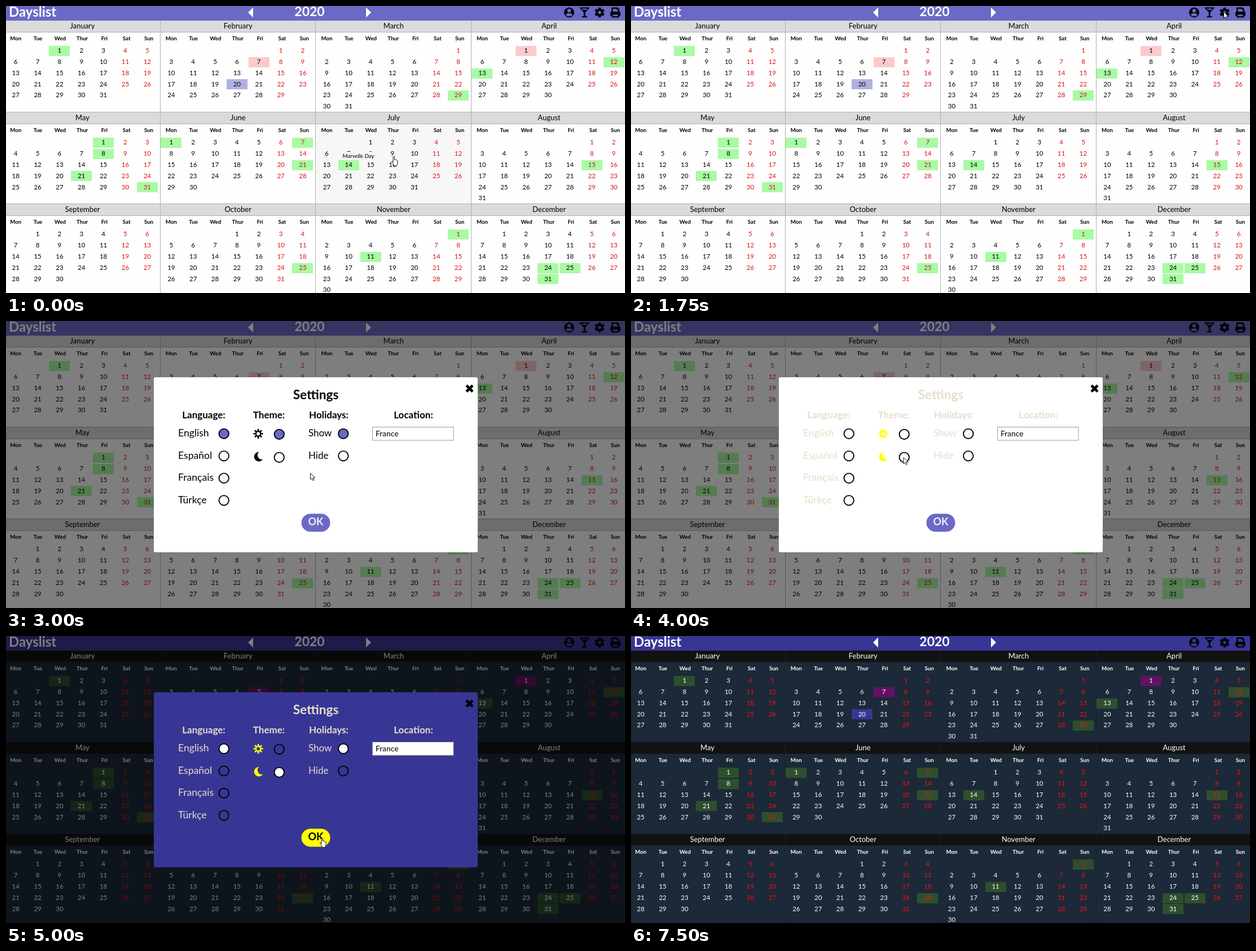
Recreate the animation shown at these times as an HTML page. Size 1097 by 510 pixels, loop 7750 ms.

```html
<!DOCTYPE html>
<html lang="en">
<head>
<meta charset="utf-8">
<title>Year calendar</title>
<style>
  html, body { margin: 0; width: 100%; height: 100%; overflow: hidden; }
  svg { display: block; width: 100%; height: 100%; font-family: Lato, sans-serif; }
  text { white-space: pre; }
  .mid { text-anchor: middle; }
  .bold { font-weight: 700; }
  .bar { fill: var(--bar); }
  .page { fill: var(--page); }
  .head { fill: var(--head); }
  .ink { fill: var(--ink); }
  .red { fill: var(--red); }
  .line { stroke: var(--line); }
  .green { fill: var(--green); }
  .pink { fill: var(--pink); }
  .blue { fill: var(--blue); }
  .box { fill: var(--box); }
  .label { fill: var(--label); }
  .icon { fill: var(--icon); }
  .iconLine { stroke: var(--icon); }
  .white { fill: #fff; }
</style>
</head>
<body>
<svg id="stage" viewBox="0 0 1097 510">
  <g id="calendar"></g>
  <g id="tip">
    <rect x="592" y="259" width="66" height="15" fill="#f8f7f7"/>
    <text x="624.5" y="269.5" class="mid" font-size="10.3" font-style="italic">Marvelle Day</text>
  </g>
  <g id="modal"></g>
  <path id="arrow" d="M.5 .5V11.7L3.1 9.4L4.9 13.4L6.8 12.6L5.1 8.7H8.7Z"
        fill="#fff" stroke="#000" stroke-width=".9"/>
  <path id="hand" d="M3.2 11V1.9Q3.2 .5 4.4 .5T5.6 1.9V6.3Q7.3 5.7 7.7 6.9Q9.2 6.4 9.5 7.7Q11 7.4 11 9V12.5Q11 14.5 9.8 16V17.7H4.4V16.2L1.1 11.6Q0 9.6 1.4 9.1Q2.3 9 3.2 11Z"
        fill="#fff" stroke="#000" stroke-width=".9"/>
</svg>
<script>
const LOOP = 7750;
const $ = id => document.getElementById(id);

const MONTHS = ['January', 'February', 'March', 'April', 'May', 'June', 'July',
  'August', 'September', 'October', 'November', 'December'];
const DAYS = ['Mon', 'Tue', 'Wed', 'Thur', 'Fri', 'Sat', 'Sun'];
const EVENTS = {
  green: '1/1 3/29 4/12 4/13 5/1 5/8 5/21 5/31 6/1 6/7 6/21 7/14 8/15 10/25 11/1 11/11 12/24 12/25 12/31'.split(' '),
  pink: ['2/7', '4/1'],
  blue: ['2/20']
};

// Light and dark value of each colour
const THEME = {
  bar: ['#6a69c6', '#383694'],
  page: ['#fefefe', '#1c2938'],
  head: ['#dbdbdb', '#121212'],
  ink: ['#000000', '#ffffff'],
  red: ['#dc1215', '#ff0d0d'],
  line: ['#b0b0b0', '#18232f'],
  green: ['#a9faa4', '#2e4f2e'],
  pink: ['#fccacc', '#621262'],
  blue: ['#b1b1e1', '#383694'],
  box: ['#ffffff', '#383694']
};

// Time, x, y, shape
const POINTER = [
  [0, 683, 266.5, 'hand'], [250, 850, 122, 'hand'], [500, 903, 74, 'hand'], [750, 901, 71, 'hand'],
  [1000, 1028, 27, 'hand'], [1250, 1040, 18, 'arrow'], [1500, 1050, 10, 'arrow'],
  [2250, 1036, 27, 'arrow'], [2500, 875, 194, 'arrow'], [2750, 709, 246, 'arrow'],
  [3000, 539, 270, 'arrow'], [3250, 494, 250, 'arrow'], [3500, 477, 236, 'arrow'],
  [4000, 482.5, 242, 'arrow'], [4250, 490, 252, 'arrow'], [4500, 519, 298, 'arrow'],
  [4750, 555, 357, 'hand'], [5000, 556, 358, 'hand'], [6750, 552, 59, 'hand'],
  [7000, 561.5, 22, 'arrow'], [7250, 0, 0, '']
];
const DARK = [[0, 0], [4250, .5], [4500, 1]];
const JULY = [[0, 1], [250, .4], [500, 0]];
const APRIL = [[0, 0], [250, .5], [500, 1], [1250, .4], [1500, 0]];

const text = (x, y, size, cls, str) =>
  `<text x="${x}" y="${y}" font-size="${size}" class="${cls}">${str}</text>`;
const rect = (x, y, w, h, cls, more = '') =>
  `<rect x="${x}" y="${y}" width="${w}" height="${h}" class="${cls}" ${more}/>`;
const line = (x1, y1, x2, y2) =>
  `<path d="M${x1} ${y1}L${x2} ${y2}" class="line" stroke-width="1"/>`;
const spokes = (n, from, to) => Array.from({ length: n }, (_, i) => {
  const c = Math.cos(i * 2 * Math.PI / n), s = Math.sin(i * 2 * Math.PI / n);
  return `M${c * from} ${s * from}L${c * to} ${s * to}`;
}).join('');

function month(m) {
  const col = m % 4, row = m >> 2;
  const x0 = 17.2 + 275.6 * col, y0 = 163.1 * row;
  const first = (new Date(2020, m, 1).getDay() + 6) % 7;
  const count = new Date(2020, m + 1, 0).getDate();
  let out = text(135.5 + 275.7 * col, y0 + 40, 13, 'mid ink', MONTHS[m]);
  DAYS.forEach((d, i) => out += text(x0 + 39.3 * i, y0 + 61, 9.7, 'mid bold ink', d));
  for (let d = 1; d <= count; d++) {
    const slot = first + d - 1, wd = slot % 7;
    const x = x0 + 38.85 * wd, y = y0 + 79.3 + 19.85 * Math.floor(slot / 7);
    const kind = Object.keys(EVENTS).find(k => EVENTS[k].includes(`${m + 1}/${d}`));
    if (kind) out += rect(Math.round(x - 18.6), Math.round(y - 8.5), 37, 18, kind);
    out += text(x, y + 3.7, 11.5, 'mid ' + (wd > 4 ? 'red' : 'ink'), d);
  }
  return out;
}

function topBar() {
  return rect(0, 0, 1097, 26, 'bar') +
    text(5, 18.7, 24, 'bold white', 'Dayslist') +
    text(538, 18.2, 23, 'mid bold white', '2020') +
    `<path d="M429 11.5L438 2.5V20.5ZM647 11.5L638 2.5V20.5Z" class="white"/>
    <circle cx="998" cy="11.5" r="9"/>
    <circle cx="998" cy="8.4" r="3.3" class="bar"/>
    <path d="M992 16.2Q993 13 996 13H1000Q1003 13 1004 16.2Q998 21 992 16.2Z" class="bar"/>
    <path d="M1016 2.5H1034.5L1026.7 11.5V18.2H1030V20.3H1020.5V18.2H1023.8V11.5ZM1020 4.6L1021.8 6.7H1028.8L1030.6 4.6Z" fill-rule="evenodd"/>
    <g transform="translate(1052 11.5)" stroke="#000">
      <path d="${spokes(6, 4, 8.8)}" transform="rotate(30)" stroke-width="4.6"/>
      <circle r="4.7" fill="none" stroke-width="4"/>
    </g>
    <path d="M1073 2.5H1084L1087 5.5V10H1084.5V6.5H1082V5H1075.5V10H1073Z"/>
    <path d="M1071 12Q1071 10 1073 10H1087Q1089 10 1089 12V17.5H1086.5V20.5H1073.5V17.5H1071ZM1075.7 15.3V18.3H1084.3V15.3Z" fill-rule="evenodd"/>`;
}

function calendar() {
  let out = rect(0, 0, 1097, 510, 'page') +
    rect(549, 210, 275, 142, '', 'id="july" fill="#f8f7f7"') +
    rect(825, 47, 272, 142, '', 'id="april" fill="#f8f7f7"');
  for (let r = 0; r < 3; r++) {
    const y = 26 + 163 * r;
    out += rect(0, y, 1097, 21, 'head') + line(0, y - .5, 1097, y - .5) + line(0, y + 20.5, 1097, y + 20.5);
  }
  [273.5, 548.5, 824.5].forEach(x => out += line(x, 26, x, 510));
  return out + MONTHS.map((_, m) => month(m)).join('') + topBar();
}

const radio = (x, y, on) =>
  `<circle cx="${x}" cy="${y}" r="8.7" stroke="#000" stroke-width="1.9" ${on ? 'class="on"' : 'fill="none"'}/>`;

function modal() {
  const heads = [[350.5, 'Language:'], [466, 'Theme:'], [572, 'Holidays:'], [722, 'Location:']];
  const langs = ['English', 'Español', 'Français', 'Türkçe'];
  return rect(0, 0, 1097, 510, '', 'opacity=".5"') +
    rect(262, 100, 574, 311, 'box', 'rx="3"') +
    text(549, 139, 22.6, 'mid bold label', 'Settings') +
    heads.map(([x, s]) => text(x, 173, 17, 'mid bold label', s)).join('') +
    langs.map((s, i) => text(305, 205.3 + 39.5 * i, 17.6, 'label', s) + radio(386.2, 200.3 + 39.5 * i, !i)).join('') +
    text(536, 205.3, 17, 'label', 'Show') + radio(597.8, 200.3, true) +
    text(536, 244.8, 17, 'label', 'Hide') + radio(597.8, 239.8) +
    radio(484.2, 201.3).replace('fill="none"', 'id="light"') +
    radio(484.2, 242.3).replace('fill="none"', 'id="dark"') +
    `<g transform="translate(447 200.3)" class="iconLine" fill="none">
      <circle r="4.3" stroke-width="2.4"/>
      <path d="${spokes(8, 5, 8.6)}" stroke-width="2.6"/>
    </g>
    <path d="M448.5 232.8A8.4 8.4 0 1 0 455.2 245.6A7.4 7.4 0 0 1 448.5 232.8Z" class="icon"/>
    <path d="M816 114.5L827 125.5M827 114.5L816 125.5" stroke="#000" stroke-width="4.6"/>` +
    rect(649.5, 188.5, 143.5, 23.5, 'white', 'stroke="#999"') +
    text(655, 204.5, 13.8, '', 'France') +
    rect(523.5, 342.5, 51, 32, '', 'rx="16" id="ok"') +
    text(549, 363, 18, 'mid bold', 'OK').replace('<text', '<text id="okText"');
}

const at = (keys, t) => keys.filter(k => k[0] <= t).pop();

function mix([a, b], p) {
  const part = (c, i) => parseInt(c.slice(i, i + 2), 16);
  return `rgb(${[1, 3, 5].map(i => Math.round(part(a, i) + (part(b, i) - part(a, i)) * p))})`;
}

const show = (id, on) => $(id).setAttribute('display', on ? 'inline' : 'none');
const fill = (id, c) => $(id).setAttribute('fill', c);

function render(t) {
  const p = at(DARK, t)[1], style = $('stage').style;
  for (const k in THEME) style.setProperty('--' + k, mix(THEME[k], p));

  const dark = t >= 4000, hover = t >= 5000;
  const accent = dark ? '#ffffff' : THEME.bar[0];
  style.setProperty('--label', dark ? '#e6decb' : '#000');
  style.setProperty('--icon', dark ? '#ff0' : '#000');
  document.querySelectorAll('.on').forEach(e => e.setAttribute('fill', accent));
  fill('light', dark ? 'none' : accent);
  fill('dark', dark ? accent : 'none');
  fill('ok', hover ? '#ff0' : THEME.bar[0]);
  fill('okText', hover ? '#000' : '#f3eff0');

  $('july').setAttribute('opacity', at(JULY, t)[1]);
  $('april').setAttribute('opacity', at(APRIL, t)[1]);
  show('tip', t < 250);
  show('modal', t >= 2000 && t < 5750);

  const [, x, y, shape] = at(POINTER, t);
  for (const id of ['arrow', 'hand']) {
    show(id, id === shape);
    $(id).setAttribute('transform', `translate(${x} ${y})`);
  }
}

$('calendar').innerHTML = calendar();
$('modal').innerHTML = modal();

const start = performance.now();
(function tick() {
  render((performance.now() - start) % LOOP);
  requestAnimationFrame(tick);
})();
</script>
</body>
</html>
```
